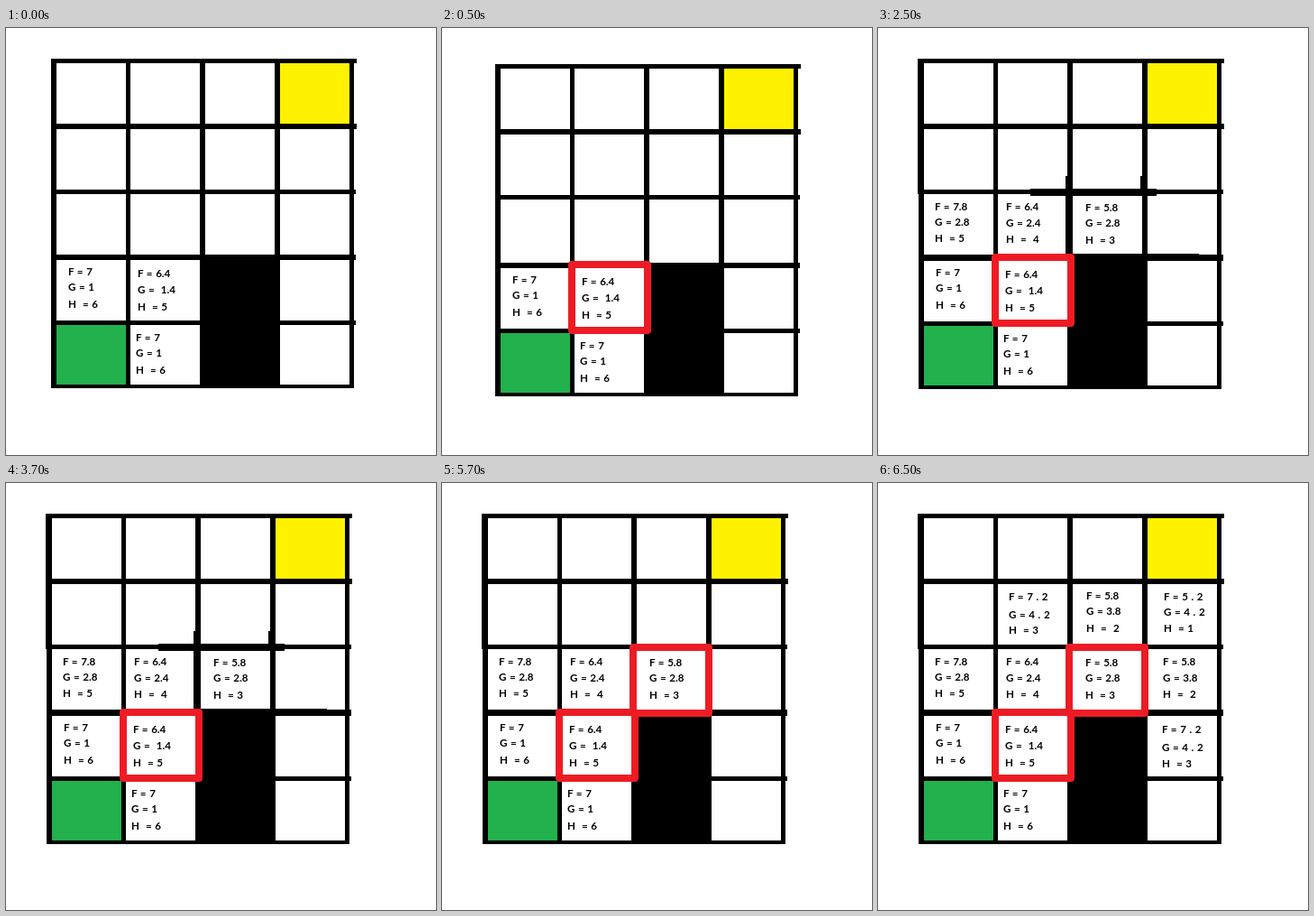
Write an HTML page that moves like this. It is 477 by 473 pixels and loops after 8 s.

```html
<!DOCTYPE html>
<html lang="en">
<head>
<meta charset="utf-8">
<title>Grid path search</title>
<style>
  html, body { margin: 0; width: 100%; height: 100%; overflow: hidden; background: #fff; }
  svg { display: block; width: 477px; height: 473px; }
  text { font: 700 11.6px Lato, Carlito, "Open Sans", sans-serif; word-spacing: 0.75px; white-space: pre; }
</style>
</head>
<body>
<svg id="stage" viewBox="0 0 477 473"></svg>
<script>
const LOOP = 8000;
const GREEN = '#22b14c', YELLOW = '#fff200', RED = '#ed1c24';
const stage = document.getElementById('stage');

function add(parent, tag, attrs = {}, content) {
  const el = document.createElementNS('http://www.w3.org/2000/svg', tag);
  for (const key in attrs) el.setAttribute(key, attrs[key]);
  if (content) el.textContent = content;
  parent.appendChild(el);
  return el;
}

function box(parent, x0, y0, x1, y1, fill = '#000') {
  add(parent, 'rect', { x: x0, y: y0, width: x1 - x0, height: y1 - y0, fill });
}

// A group that is visible only between two times
function layer(from, to) {
  const g = add(stage, 'g');
  const frames = [{ offset: 0, opacity: from ? 0 : 1, easing: 'steps(1, end)' }];
  if (from) frames.push({ offset: from / LOOP, opacity: 1, easing: 'steps(1, end)' });
  if (to < LOOP) frames.push({ offset: to / LOOP, opacity: 0, easing: 'steps(1, end)' });
  frames.push({ offset: 1, opacity: to < LOOP ? 0 : 1 });
  g.animate(frames, { duration: LOOP, iterations: Infinity });
  return g;
}

// x: left edge; rows: top and bottom edge of each horizontal line
function grid(g, x, rows) {
  const cols = [[0, 6], [83, 88], [165, 171], [248, 254], [331, 336]];
  const over = [339, 339, 338, 338, 338, 336];
  const top = rows[0][0], bottom = rows[5][1];
  box(g, x + 254, rows[0][1], x + 331, rows[1][0], YELLOW);
  box(g, x + 6, rows[4][1], x + 83, rows[5][0], GREEN);
  box(g, x + 165, rows[3][0], x + 254, bottom);
  for (const [a, b] of cols) box(g, x + a, top, x + b, bottom);
  rows.forEach(([a, b], i) => box(g, x, a, x + over[i], b));
}

// Each cell: x, the three lines, the middle height of each line
function labels(g, cells, dx = 0, dy = 0) {
  for (const [x, lines, heights] of cells) {
    lines.forEach((text, i) => add(g, 'text', { x: x + dx, y: heights[i] + dy + 4.3 }, text));
  }
}

function mark(g, x, y) {
  add(g, 'rect', {
    x: x + 4, y: y + 4, width: 84, height: 73,
    fill: 'none', stroke: RED, 'stroke-width': 8, 'stroke-linejoin': 'round'
  });
}

const start = [
  [64, ['F = 7', 'G = 1', 'H  = 6'], [271, 288, 307]],
  [141, ['F = 6.4', 'G =  1.4', 'H  = 5'], [273, 291, 310]],
  [139, ['F = 7', 'G = 1', 'H  = 6'], [344, 361, 380]]
];
const second = [
  [63, ['F = 7.8', 'G = 2.8', 'H  = 5'], [198, 215, 233]],
  [142, ['F = 6.4', 'G = 2.4', 'H  =  4'], [198, 216, 234]],
  [230, ['F = 5.8', 'G = 2.8', 'H  = 3'], [199, 216, 235]]
];
const third = [
  [145, ['F = 7 . 2', 'G = 4 . 2', 'H  = 3'], [126, 146, 163]],
  [231, ['F = 5.8', 'G = 3.8', 'H  =  2'], [125, 142, 161]],
  [317, ['F = 5 . 2', 'G = 4 . 2', 'H  = 1'], [126, 143, 161]],
  [316, ['F = 5.8', 'G = 3.8', 'H  =  2'], [198, 216, 234]],
  [315, ['F = 7 . 2', 'G = 4 . 2', 'H  = 3'], [273, 293, 311]]
];

const opening = layer(0, 500);
grid(opening, 50, [[34, 39], [106, 112], [179, 184], [251, 257], [324, 329], [395, 399]]);
labels(opening, start, 5, -1);

const first = layer(500, 2500);
grid(first, 59, [[40, 45], [112, 118], [185, 190], [260, 266], [333, 338], [404, 408]]);
labels(first, start, 14, 8);
mark(first, 140, 258);

const board = layer(2500, LOOP);
grid(board, 45, [[34, 39], [106, 112], [179, 184], [251, 258], [325, 330], [396, 400]]);
box(board, 44, 34, 46, 184);
labels(board, start);
labels(board, second);

const strokes = layer(2500, 4500);
box(strokes, 169, 178, 309, 186);
box(strokes, 208, 164, 216, 252);
box(strokes, 291, 164, 299, 186);
box(strokes, 215, 250, 356, 256);

mark(layer(4500, LOOP), 208, 178);
mark(layer(2500, LOOP), 126, 250);
labels(layer(6500, LOOP), third);
</script>
</body>
</html>
```
